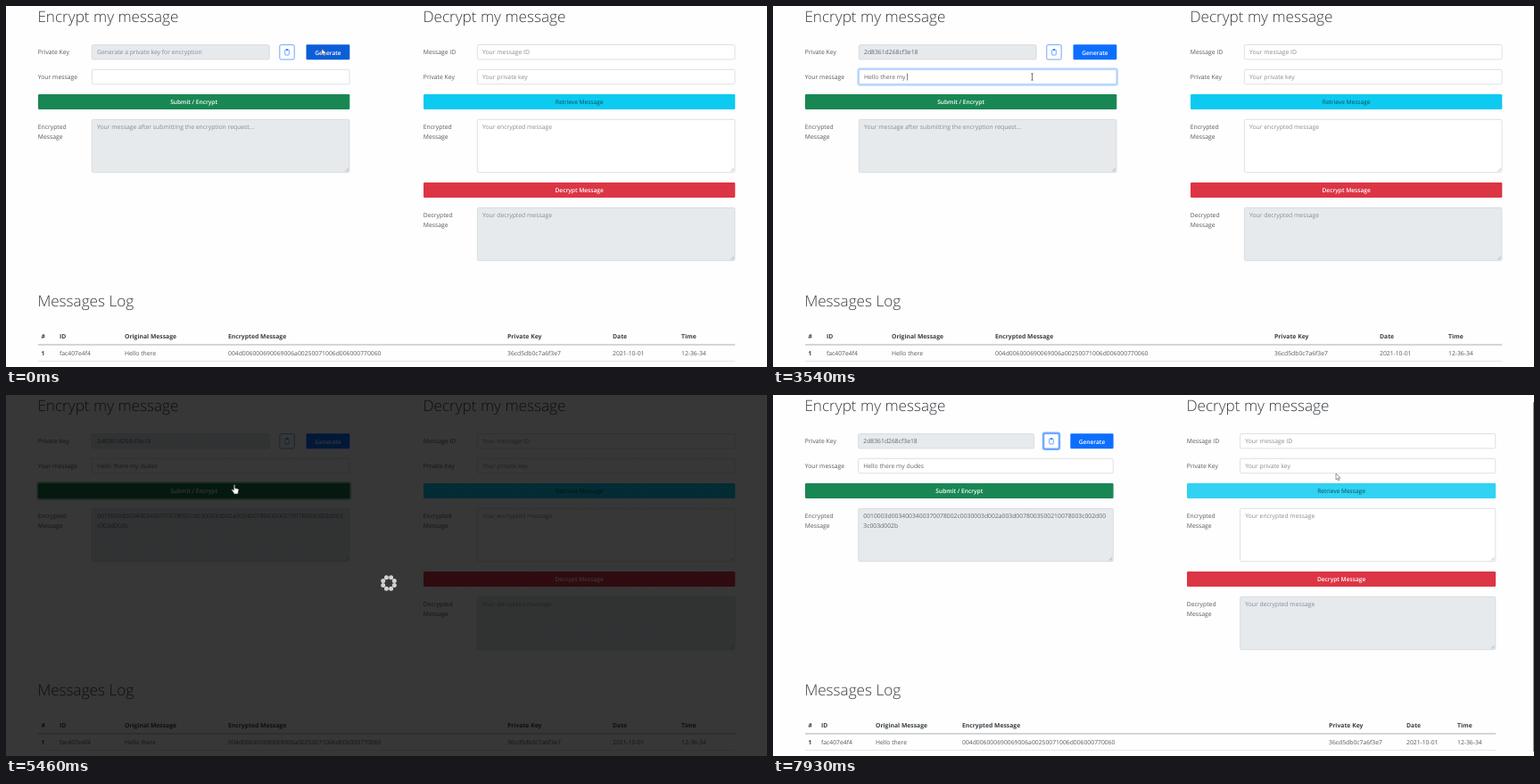
Recreate the animation shown at these times as an HTML page. Size 853 by 405 pixels, loop 8000 ms.

```html
<!DOCTYPE html>
<html lang="en">
<head>
<meta charset="utf-8">
<title>Message encryption</title>
<style>
  html, body { margin: 0; width: 100%; height: 100%; overflow: hidden; background: #fefefe; }
  svg { display: block; width: 853px; height: 405px; }
  text { font: 6.8px "Open Sans", "Noto Sans", sans-serif; fill: #55595d; white-space: pre; text-rendering: geometricPrecision; }
  .title { font-size: 17.15px; font-weight: 300; fill: #363b40; }
  .hint { fill: #868c92; }
  .value { fill: #62676c; }
  .head { font-weight: 700; fill: #3a3e42; }
  .button { font-size: 6.6px; font-weight: 600; text-anchor: middle; }
  .menu { font: 700 5.7px "Liberation Serif", "Noto Serif", serif; fill: #fff; }
</style>
</head>
<body>
<svg id="stage" viewBox="0 0 853 405" xmlns="http://www.w3.org/2000/svg"></svg>
<script>
const LOOP = 8000, STEP = 120;
const stage = document.getElementById('stage');
const pen = document.createElement('canvas').getContext('2d');
pen.font = '68px "Open Sans", "Noto Sans", sans-serif';

const KEY = '2d8361d268cf3e18';
const CIPHER = '0010003d0034003400370078002c0030003d002a003d0078003500210078003c002d003c003d002b';
const MESSAGE = 'Hello there my dudes';

// [time, number of typed characters]
const typing = [[1710, 1], [1830, 2], [2110, 3], [2230, 5], [2380, 7], [2500, 8],
  [2780, 9], [2900, 10], [3020, 11], [3140, 12], [3420, 13], [3540, 15],
  [3940, 16], [4060, 17], [4180, 19], [4300, 20]];

// [start, steps, x, y]
const moves = [[0, 1, 354, 48], [240, 4, 300, 72], [750, 1, 290.5, 79.5], [4800, 2, 268, 93],
  [5060, 1, 257.5, 98], [5460, 1, 256, 100.5], [5580, 1, 250.5, 103], [6010, 2, 279, 124],
  [6280, 5, 312, 51], [7180, 5, 595, 88], [7810, 1, 620, 102], [7930, 1, 631, 88]];
const pointers = [[0, 'arrow'], [750, 'beam'], [4920, 'arrow'], [5060, 'hand'], [6130, 'beam'],
  [6520, 'arrow'], [6640, 'hand'], [7300, 'arrow'], [7810, 'hand'], [7930, 'arrow']];

const wide = { left: 36, leftEnd: 385.3, right: 468, end: 817.3, indent: 60, key: 295.5, copy: 306.5, make: 336.5,
  fit: 71, columns: [39.5, 60, 133, 249, 562, 680, 757] };
const narrow = { left: 36, leftEnd: 381.6, right: 464, end: 810.1, indent: 59.3, key: 293, copy: 303.5, make: 333.3,
  fit: 70, columns: [39.5, 54, 115, 212, 623, 710, 767] };

const latest = (list, t, start) => list.reduce((v, [at, next]) => t >= at ? next : v, start);
const text = (x, y, s, kind = '') => `<text x="${x}" y="${y}" class="${kind}">${s}</text>`;
const rect = (x, y, w, h, fill, more = '') => `<rect x="${x}" y="${y}" width="${w}" height="${h}" fill="${fill}" ${more}/>`;
const path = (d, fill, stroke, more = '') => `<path d="${d}" fill="${fill}" stroke="${stroke}" ${more}/>`;
const label = (x, y, ...lines) => lines.map((s, i) => text(x - .2, y + i * 10.8, s)).join('');

const ring = (x, y, w, h, color) =>
  rect(x - .8, y - .8, w + 1.6, h + 1.6, 'none', `rx="2.4" stroke="${color}" stroke-width="1.8"`);

function field(x, end, y, { h = 17, off, focus } = {}) {
  const w = end - x;
  let out = focus ? ring(x, y, w, h, '#c2dbfe') : '';
  out += rect(x + .3, y + .3, w - .6, h - .6, off ? '#e6eaed' : '#fff',
    `rx="1.6" stroke="${focus ? '#86b7fe' : '#ced4da'}" stroke-width=".7"`);
  if (h > 20) out += path(`M${end - 5} ${y + h - 1.5}l3.5-3.5m-1.5 3.5l1.5-1.5`, 'none', '#888', 'stroke-width=".5"');
  return out;
}

function button(x, end, y, s, fill, { ink = '#fff', weight = 600, glow } = {}) {
  return (glow ? ring(x, y, end - x, 17, glow) : '') + rect(x, y, end - x, 17, fill, 'rx="1.2"') +
    `<text x="${(x + end) / 2}" y="${y + 11.2}" class="button" style="fill:${ink};font-weight:${weight}">${s}</text>`;
}

function copyButton(x, hover, focus) {
  const ink = hover ? '#fff' : '#0d6efd';
  return (focus ? ring(x, 43.3, 17, 17, '#74abfd') : '') +
    rect(x + .3, 43.6, 16.4, 16.4, hover ? '#0d6efd' : '#fff', 'rx="1.6" stroke="#0d6efd" stroke-width=".6"') +
    rect(x + 6.2, 49.2, 4.6, 5.8, 'none', `rx=".6" stroke="${ink}" stroke-width=".6"`) +
    rect(x + 7.3, 48.3, 2.4, 1.5, ink, 'rx=".4"');
}

function encryptForm(t, p) {
  const x = p.left + p.indent, inside = x + 6, focus = t >= 750 && t < 5310;
  const typed = MESSAGE.slice(0, latest(typing, t, 0));
  const sent = t >= 5460, onSubmit = t >= 5060 && t < 7060;
  let out = text(p.left - .6, 18.4, 'Encrypt my message', 'title') +
    label(p.left, 54.3, 'Private Key') + label(p.left, 82.3, 'Your message') +
    label(p.left, 138.2, 'Encrypted', 'Message') +
    field(x, p.key, 43.3, { off: true }) +
    (t < 120 ? text(inside, 54.3, 'Generate a private key for encryption', 'hint') : text(inside, 54.3, KEY, 'value')) +
    copyButton(p.copy, t >= 6640 && t < 7300, t >= 7060) +
    button(p.make, p.leftEnd, 43.3, 'Generate', t < 480 ? '#0b5ed7' : '#0d6efd',
      { glow: t >= 120 && t < 750 && '#a9cbfe' }) +
    field(x, p.leftEnd, 71, { focus }) + text(inside, 82.3, typed, 'value');
  const caretOn = focus && t < 4800 && !(t >= 1290 && t < 1710);
  if (caretOn) out += rect(inside + pen.measureText(typed).width / 10 + .1, 75.5, .6, 8, '#333');
  out += button(p.left, p.leftEnd, 99, 'Submit / Encrypt', onSubmit ? '#157347' : '#198754',
    { glow: t >= 5310 && t < 7060 && '#8cc3a9' }) + field(x, p.leftEnd, 127, { h: 60, off: true });
  out += sent
    ? text(inside, 138.2, CIPHER.slice(0, p.fit), 'value') + text(inside, 149, CIPHER.slice(p.fit), 'value')
    : text(inside, 138.2, 'Your message after submitting the encryption request...', 'hint');
  return out;
}

function decryptForm(t, p) {
  const { right, end } = p, x = right + p.indent;
  const row = (y, lines, hint, options) =>
    label(right, y + 11.2, ...lines) + field(x, end, y, options) + text(x + 6, y + 11.2, hint, 'hint');
  return text(right - .6, 18.4, 'Decrypt my message', 'title') +
    row(43.2, ['Message ID'], 'Your message ID') +
    row(71, ['Private Key'], 'Your private key') +
    button(right, end, 99, 'Retrieve Message', t >= 7810 ? '#31d2f2' : '#0dcaf0', { ink: '#0b4d5b', weight: 500 }) +
    row(127, ['Encrypted', 'Message'], 'Your encrypted message', { h: 60 }) +
    button(right, end, 198, 'Decrypt Message', '#dc3545') +
    row(226, ['Decrypted', 'Message'], 'Your decrypted message', { h: 60, off: true });
}

function log(p) {
  const heads = ['#', 'ID', 'Original Message', 'Encrypted Message', 'Private Key', 'Date', 'Time'];
  const cells = ['1', 'fac407e4f4', 'Hello there', '004d006000690069006a00250071006d006000770060',
    '36cd5db0c7a6f3e7', '2021-10-01', '12-36-34'];
  return text(35.4, 336.8, 'Messages Log', 'title') +
    p.columns.map((x, i) => text(x, 373.3, heads[i], 'head') + text(x, 391.8, cells[i], i ? '' : 'head')).join('') +
    rect(36, 379.5, p.end - 36, 1, '#a9b0b6') + rect(36, 398, p.end - 36, .8, '#dee2e6');
}

function menu(t) {
  if (t < 750 || t >= 1830) return '';
  const opacity = t < 870 || t >= 1710 ? .5 : 1;
  return `<g opacity="${opacity}">` + rect(98, 89.5, 142, 38.5, '#3b3b3b', 'rx="1"') +
    text(103, 102.6, 'asdas', 'menu') +
    text(103, 118.6, 'I am a great dude with a terrible sense of humor', 'menu') + '</g>';
}

// Dark backdrop in three elliptical bands, lightest around the spinner.
function loading(t) {
  if (t < 5310 || t >= 5580) return '';
  const turn = Math.floor(t / STEP) * 45 + 22.5;
  const stop = (offset, opacity) => `<stop offset="${offset}" stop-color="#000" stop-opacity="${opacity}"/>`;
  let dots = '';
  for (let i = 0; i < 8; i++) {
    const a = (i * 45 + turn) * Math.PI / 180;
    dots += `<circle cx="${(429 + 6.8 * Math.cos(a)).toFixed(2)}" cy="${(211 + 6.8 * Math.sin(a)).toFixed(2)}" r="2.5" fill="#d2d2d2"/>`;
  }
  return `<g opacity="${t < 5460 ? .5 : 1}"><defs><radialGradient id="shade" gradientUnits="userSpaceOnUse" r="1"
    gradientTransform="translate(426 210) scale(440 207)">` +
    stop(.32, .72) + stop(.325, .765) + stop(.995, .765) + stop(1, .785) +
    '</radialGradient></defs>' + rect(0, 0, 853, 405, 'url(#shade)') + dots + '</g>';
}

function tooltip(t) {
  if (t < 6910 || t >= 7060) return '';
  return rect(268.3, 60.3, 69.4, 9.4, '#fff', 'stroke="#c4c4c4" stroke-width=".6"') + text(273, 67.4, 'Copy to clipboard');
}

function cursor(t) {
  let x = 354, y = 48;
  for (const [start, steps, toX, toY] of moves) {
    if (t < start) break;
    const k = Math.min(1, (Math.floor((t - start) / STEP) + 1) / steps);
    x += (toX - x) * k;
    y += (toY - y) * k;
  }
  const shapes = {
    arrow: path('M0 0V7L1.6 5.5 2.7 8 3.7 7.6 2.7 5.1H4.9Z', '#fff', '#555', 'stroke-width=".6"'),
    beam: path('M-1.3-3.6H1.3M0-3.6V3.6M-1.3 3.6H1.3', 'none', '#444', 'stroke-width=".7"'),
    hand: path('M-.8 .6Q0-.6 .8 .6V4L4.2 4.8Q5 5 4.9 6L4.2 9V10.6H-.8V9.3L-3.2 6.3Q-3 5-1.8 5.5L-.8 6.3Z',
      '#fff', '#222', 'stroke-width=".7" stroke-linejoin="round"')
  };
  const busy = t >= 5060 && t < 5310 ? '<circle cx="1" cy="2.5" r="4" fill="none" stroke="#888" stroke-width=".6"/>' : '';
  return `<g transform="translate(${x.toFixed(2)} ${y.toFixed(2)})">${busy}${shapes[latest(pointers, t)]}</g>`;
}

function scene(t) {
  const p = t < 5580 ? wide : narrow;
  return rect(0, 0, 853, 405, '#fefefe') + encryptForm(t, p) + decryptForm(t, p) + log(p) +
    (p === narrow ? rect(852, 8, 1, 392, '#8a8a8a') : '') +
    menu(t) + loading(t) + tooltip(t) + cursor(t);
}

let shown = '';
const begin = performance.now();
function draw() {
  const next = scene((performance.now() - begin) % LOOP);
  if (next !== shown) stage.innerHTML = shown = next;
  requestAnimationFrame(draw);
}
draw();
</script>
</body>
</html>
```
